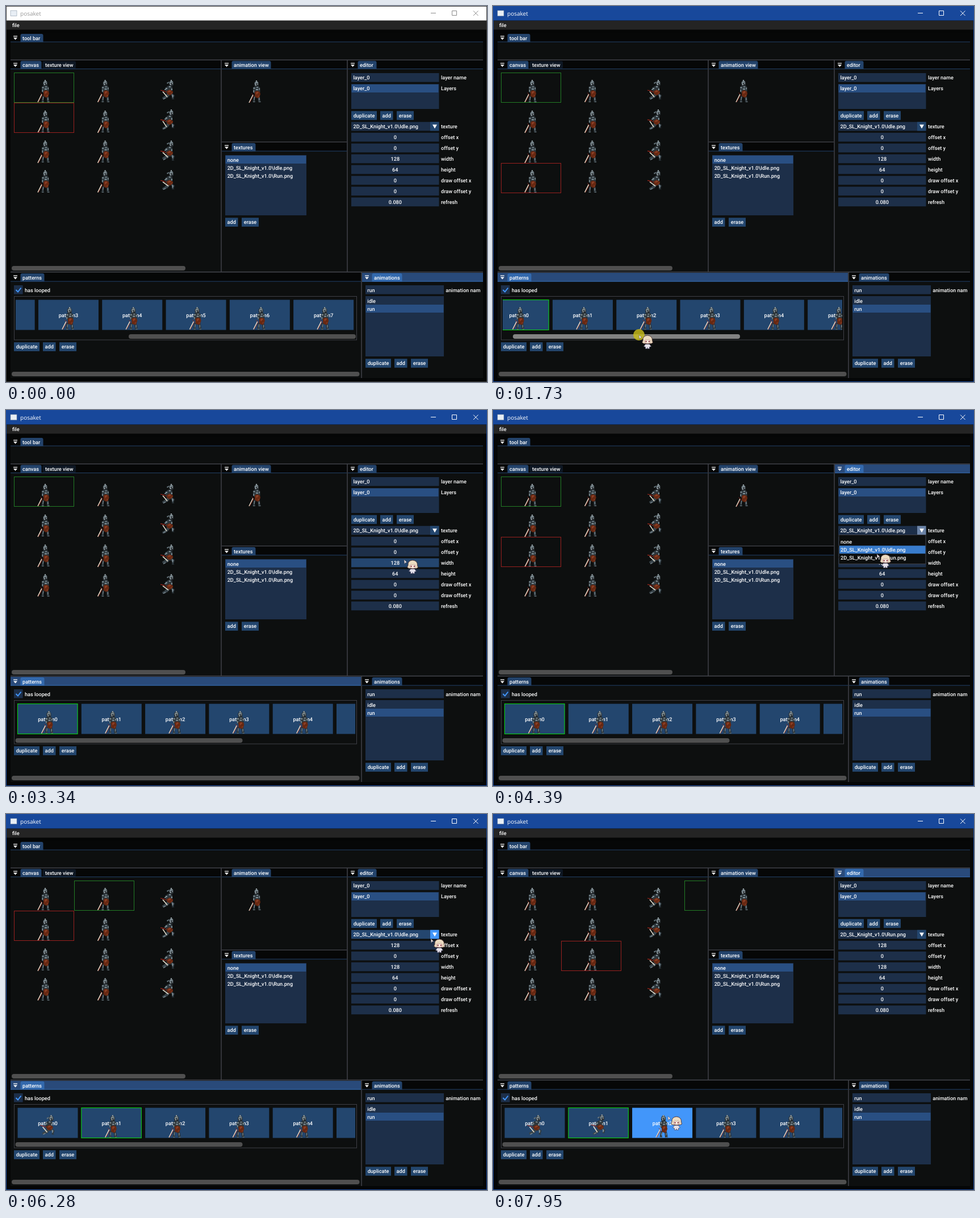
Write an HTML page that moves like this. It is 847 px wide and 661 px high and loops after 8 s.

```html
<!DOCTYPE html>
<html lang="en">
<head>
<meta charset="utf-8">
<title>posaket</title>
<style>
html, body { margin: 0; width: 100%; height: 100%; overflow: hidden; background: #050606; }
svg { display: block; width: 100%; height: 100%; }
text { font: 500 9.15px Roboto, sans-serif; fill: #fff; white-space: pre; text-rendering: geometricPrecision; }
#title { font: 400 10px "Open Sans", sans-serif; }
</style>
</head>
<body>
<svg id="stage" viewBox="0 0 847 661"></svg>
<script>
const C = {
  win: '#0d0f0f', bar: '#060707', barOn: '#294a7a', tab: '#23436b', tabOn: '#3369ad',
  tabOff: '#0e1723', btn: '#23466e', hot: '#4296fa', frame: '#1d2f49', frameHot: '#24466f',
  row: '#294f82', rowHot: '#397ccc', line: '#3f4047', grab: '#4f4f4f'
};
const LOOP = 8000;
const ROW = 15.6; // height of one control

// markup helpers
const rect = (x, y, w, h, fill, more = '') =>
  `<rect x="${x}" y="${y}" width="${w}" height="${h}" fill="${fill}" ${more}/>`;
const text = (x, cy, s, more = '') => `<text x="${x}" y="${cy + 3.3}" ${more}>${s}</text>`;
const path = (d, fill, more = '') => `<path d="${d}" fill="${fill}" ${more}/>`;
const stroke = (d, color, w = 1, more = '') => path(d, 'none', `stroke="${color}" stroke-width="${w}" ${more}`);
const button = (x, y, w, s) => rect(x, y, w, ROW, C.btn) + text(x + w / 2, y + 7.8, s, 'text-anchor="middle"');
const buttons = (x, y) => button(x, y, 45, 'duplicate') + button(x + 51, y, 22.5, 'add') + button(x + 80, y, 30, 'erase');
const grab = (x, y, w, more = '') => rect(x, y, w, 8, C.grab, `rx="4" ${more}`);
const use = (id, x, y, more = '') => `<use href="#${id}" x="${x}" y="${y}" ${more}/>`;

// knight sprites, drawn in a 105.5 x 52.8 cell
const head = (x, y) => `<g transform="translate(${x} ${y})">` +
  path('M1 4l3-4h2l3 4v5l-3 2h-3l-2-2z', '#2a3034') +
  path('M2 4l2-2h3l1 2v1h-4v2h-2z', '#7d8b91') +
  path('M4 0h2v1.500h-2zM3 7h1.500v2h-1.500zM6 6h2v1h-2z', '#b9c5c9') + '</g>';

function idle(bob) {
  return path('M50 41h4l-2 6 1 5h-4.500zM57 42h4l1.500 10h-4.500z', '#283035') +
    path('M51 43h1.500l-1 6h-1zM59 44h1.500v5h-1.500zM49 51h3.500v1h-3.500zM59 51h3.500v1h-3.500z', '#74838a') +
    `<g transform="translate(0 ${bob})">` +
    path('M49 25l4-2h6l2.500 3v7l-2 3h-8l-2.500-3z', '#2e373c') +
    path('M49.500 25.500h3v2h-3zM55 24.500h3v1.500h-3zM54 28h4v2h-4zM49.500 30h1.500v4h-1.500zM59.500 26.500h1.500v3h-1.500z', '#84949b') +
    head(50, 13) +
    path('M52 33l4-2 5 2 1 4-2 6-4 1-4-3z', '#672812') +
    path('M54 34.500l3-2 2 1.500-4 4zM57 41l3-2-1 3z', '#8c4128') +
    stroke('M49 38L42 52', '#e6dfcd', 1.6) +
    stroke('M46.500 35.500l4 4M50 39.500l-7 12.500', '#95281c', .8) + '</g>';
}

function run(n) {
  const a = [0, -1, 1, 2][n], k = [0, 3, -2, 1][n], y = [0, -1, 1, 0][n];
  return `<g transform="translate(0 ${y})">` +
    path(`M52 36l5 3-4 5-5 ${2 + k / 2}-4 1-1-3 5-3z`, '#384349') +
    path(`M55 36l6 1 4 3-2 ${6 - k / 2} 2 1h-5l1-6-6-2z`, '#2d373d') +
    path('M60 38l3 2-1 4h-1.500zM45 46l4-2v1.500l-4 2z', '#7c8b94') +
    path('M48 27l6-4 7 2v7l-4 6-7-2z', '#2e373c') +
    path('M49 27h3v2h-3zM55 24h3v2h-3zM47 29h3v1.500h-3zM59 28h2v3h-2z', '#84949b') +
    path('M51 18l4-2v2l-3 2z', '#66757c') + head(54, 13) +
    path('M50 33l6-3 6 3v3l-5 4-5-2z', '#672812') +
    path('M53 33l4-2 2 2-5 2zM57 37l4-2-1 2z', '#8c4128') +
    stroke(`M44 33.500L${52 + a} ${43 - a}`, '#e6dfcd', 1.6) +
    stroke('M40 31l7 1.500 2 2', '#a3281b', 1.2) + '</g>';
}

// cells: columns 0-1 hold the idle sheet, 2-3 the run sheet
const cellX = c => [14, 119.6, 232, 337.4][c];
const cellY = r => 117 + r * 52.9;
const outline = (id, color) => `<rect id="${id}" width="105" height="52" fill="none" stroke="${color}"/>`;

const panels = {
  tools: ['tool bar', 8, 48, 832, 46, 40],
  canvas: ['canvas', 8, 95.5, 370, 371, 37],
  view: ['animation view', 380, 95.5, 220, 142, 69],
  textures: ['textures', 380, 240, 220, 227, 42],
  editor: ['editor', 602, 95.5, 238, 371, 33],
  patterns: ['patterns', 8, 469, 617, 185, 42],
  anims: ['animations', 627, 469, 213, 185, 53]
};

function panel(id) {
  const [label, x, y, w, h, tw] = panels[id];
  return rect(x, y, w, h, C.win) + rect(x, y, w, ROW, C.bar, `id="${id}Bar"`) +
    path(`M${x + 17.5} ${y + ROW}v-11.500q0-3 3-3h${tw - 6}q3 0 3 3v11.500z`, C.tab, `id="${id}Tab"`) +
    rect(x, y + ROW - 1, w, 1, C.tab, `id="${id}Line"`) +
    path(`M${x + 5} ${y + 4.5}h7v1.300h-7zM${x + 5} ${y + 7.500}h7l-3.500 4z`, '#fff') +
    text(x + 21, y + 8.2, label);
}

const fields = ['offset x', 'offset y', 'width', 'height', 'draw offset x', 'draw offset y', 'refresh'];
const values = ['0', '0', '128', '64', '0', '0', '0.080'];
const fieldY = i => 222.8 + i * 18.97;
const files = ['2D_SL_Knight_v1.0\\Idle.png', '2D_SL_Knight_v1.0\\Run.png'];
const patX = i => 20.5 + i * 112.3;
const range = n => [...Array(n).keys()];

function build() {
  let s = '<defs>' + [0, 1].map(i => `<g id="idle${i}">${idle(i)}</g>`).join('') +
    range(4).map(i => `<g id="run${i}">${run(i)}</g>`).join('') +
    '<clipPath id="canvasClip"><rect x="9" y="112" width="366" height="344"/></clipPath>' +
    '<clipPath id="listClip"><rect x="17" y="512" width="598" height="64"/></clipPath>' +
    '<clipPath id="animClip"><rect x="627" y="485" width="209" height="169"/></clipPath></defs>';

  s += rect(0, 0, 847, 661, '#050606') + rect(0, 0, 847, 25.5, '#fff', 'id="caption"') +
    rect(8, 8, 11, 9.5, '#e8eef5', 'stroke="#8a99aa" stroke-width=".6"') +
    '<text id="title" x="25" y="16.6">posaket</text>' +
    stroke('M748 12.500h9M785.500 8.500h8v8h-8zM823 8.500l8.500 8.500M831.500 8.500l-8.500 8.500', '#999', 1, 'id="winBtns"') +
    rect(1, 26, 845, ROW, '#242424') + text(11, 34, 'file') +
    rect(.5, .5, 846, 660, 'none', 'id="edge"');

  s += Object.keys(panels).map(panel).join('') +
    rect(64.5, 97, 58.5, 13, C.tabOff, 'rx="2"') + text(69, 103.7, 'texture view') +
    stroke('M8 94.800H840M379 95V467M380 239H600M601 95V467M8 467.600H840M626 468V654', C.line, 1.6);

  // canvas and preview
  s += '<g clip-path="url(#canvasClip)">';
  for (let r = 0; r < 4; r++)
    for (let c = 0; c < 3; c++)
      s += use(c < 2 ? 'idle' + (r === 1 || r === 2 ? 1 : 0) : 'run' + r, cellX(c), cellY(r));
  s += outline('red', '#98201f') + outline('green', '#227c25') + '</g>' +
    grab(10, 457, 306) + use('idle0', 386, 117, 'id="preview"');

  // texture list
  s += rect(386, 262, 143, 106, C.frame) + rect(386.5, 263, 142, 14, C.row) +
    ['none', ...files].map((f, i) => text(389.7, 270.3 + i * 14, f)).join('') +
    button(386, 372.3, 22.5, 'add') + button(415, 372.3, 30, 'erase');

  // editor
  s += rect(608, 118, 154.5, ROW, C.frame) + text(611.5, 126, 'layer_0') + text(766, 126, 'layer name') +
    rect(608, 137, 154.5, 44, C.frame) + rect(608.5, 138, 153, 14, C.row) +
    text(611.5, 145, 'layer_0') + text(766, 145, 'Layers') + buttons(608, 184.7) +
    rect(608, 203.8, 154.5, ROW, C.frame, 'id="combo"') + rect(747, 203.8, 15.5, ROW, C.btn, 'id="arrow"') +
    path('M751 208.500h8l-4 7z', '#fff') + text(611.5, 211.5, files[0], 'id="file"') + text(766, 211.5, 'texture') +
    fields.map((f, i) => rect(608, fieldY(i), 154.5, ROW, C.frame, `id="field${i}"`) +
      text(685.3, fieldY(i) + 7.8, values[i], `id="value${i}" text-anchor="middle"`) +
      text(766, fieldY(i) + 7.8, f)).join('');

  // patterns
  s += rect(14, 491, ROW, ROW, C.frame) + stroke('M17.500 499l3.500 3.500 5.500-7', C.hot, 2) + text(33, 499.2, 'has looped') +
    rect(14.5, 510.5, 603, 76.5, 'none', `stroke="${C.line}"`) +
    '<g clip-path="url(#listClip)"><g id="strip">' +
    range(8).map(i => rect(patX(i), 516.5, 106, 53, C.btn, `id="pat${i}"`) +
      text(patX(i) + 53, 543.2, 'pattern' + i, 'text-anchor="middle"') +
      use('idle0', patX(i), 516.5, `id="pose${i}"`)).join('') +
    rect(0, 516.5, 105.5, 53, 'none', 'id="chosen" stroke="#06d80e"') + '</g></g>' +
    grab(16.5, 577, 400, 'id="thumb"') + buttons(14, 591.2) + grab(10, 643, 612.5);

  // animations
  s += '<g clip-path="url(#animClip)">' + rect(633, 491, 138, ROW, C.frame) + text(636.3, 499.2, 'run') +
    text(774.3, 499.2, 'animation name') + '</g>' +
    rect(633, 510, 138, 106, C.frame) + rect(633.5, 525, 137, 14, C.row) +
    text(636.3, 518.2, 'idle') + text(636.3, 532.3, 'run') + buttons(633, 620.2);

  // drop-down
  s += '<g id="popup">' + rect(609, 219.5, 153, 51, '#0c0e0e', `stroke="${C.line}"`) +
    files.map((f, i) => rect(610, 238.5 + i * 14, 151.5, 14, 'none', `id="item${i}"`)).join('') +
    ['none', ...files].map((f, i) => text(612, 231.3 + i * 14.1, f)).join('') + '</g>';

  // pointer with its little companion
  s += '<g id="pointer"><circle id="press" r="10" fill="#c9bd1b" opacity=".82"/>' +
    path('M0 0l5 5-2.500.300-1.700 2.500z', '#f3e6ea', 'stroke="#333" stroke-width=".4"') +
    path('M7 10q-1-8 8-9 9 1 8.500 9l1 4-3 1.500h-13l-3-2z', '#ecdcc2', 'stroke="#4b3030" stroke-width=".9"') +
    path('M10 10l3-2 2 1.500 2-1.500 3.500 2v3.500q-5 4-10.500 0z', '#f9e6dc', 'stroke="#9a7466" stroke-width=".5"') +
    path('M11.500 10.500h2v2.500h-2zM17 10.500h2v2.500h-2z', '#8d3c45') +
    path('M11.500 16.500h7l3 4-3 1v3h-3l-.500-2-.500 2h-3v-3l-3-1z', '#e4e1ea', 'stroke="#54506a" stroke-width=".8"') + '</g>';
  return s;
}

const stage = document.getElementById('stage');
stage.innerHTML = build();
const el = {};
stage.querySelectorAll('[id]').forEach(e => el[e.id] = e);
const set = (id, attrs) => { for (const k in attrs) el[id].setAttribute(k, attrs[k]); };
const show = (id, on) => set(id, { display: on ? 'inline' : 'none' });

// pointer stops: time, x, y
const stops = [
  [300, 764, 668], [820, 462, 594], [970, 438, 579], [1080, 438, 579], [1735, 257, 578], [1930, 237, 578],
  [2300, 250, 572], [3200, 700, 264], [3345, 701, 263], [3720, 750, 212], [3880, 750, 212],
  [4390, 676, 253], [4560, 674, 260], [4730, 674, 260], [5230, 194, 529], [5540, 192, 528],
  [6270, 748, 219], [6370, 752, 213], [6500, 752, 213], [6880, 690, 260], [7060, 690, 260], [7900, 309, 531], [7950, 308, 531]
];
const presses = [[1000, 2000], [3770, 3870], [4600, 4700], [5430, 5530], [6400, 6500], [6940, 7040]];

function pointerAt(t) {
  const i = stops.findIndex(s => s[0] > t);
  if (i < 0) return stops[stops.length - 1].slice(1);
  if (!i) return stops[0].slice(1);
  const [a, b] = [stops[i - 1], stops[i]];
  const k = (t - a[0]) / (b[0] - a[0]);
  const e = k * k * (3 - 2 * k);
  return [a[1] + (b[1] - a[1]) * e, a[2] + (b[2] - a[2]) * e];
}

function draw(t) {
  const [px, py] = pointerAt(t);
  const pressed = presses.some(([a, b]) => t >= a && t < b);
  const dragging = t >= 1000 && t < 2000;
  const open = t >= 3840 && t < 4660 || t >= 6460 && t < 7000;
  const ran = [t >= 4660, t >= 7000];
  const chosen = t >= 5480 ? 1 : 0;
  const focus = t < 1000 ? 'anims' : t < 3840 ? 'patterns' : t < 5480 ? 'editor' : t < 6460 ? 'patterns' : 'editor';
  const active = t >= 1000;
  const over = (x, y, w, h) => !dragging && px >= x && px < x + w && py >= y && py < y + h;

  set('caption', { fill: active ? '#18489b' : '#fff' });
  set('edge', { stroke: active ? '#18489b' : '#3a3a3a' });
  el.title.style.fill = active ? '#fff' : '#999';
  set('winBtns', { stroke: active ? '#fff' : '#8a8a8a' });
  for (const id in panels) {
    const on = id === focus;
    set(id + 'Bar', { fill: on ? C.barOn : C.bar });
    set(id + 'Tab', { fill: on ? C.tabOn : C.tab });
    set(id + 'Line', { fill: on ? C.tabOn : C.tab });
  }

  // playback
  const step = Math.floor(t / 87.3 + 2.5) % 8;
  const cell = i => ran[i] ? [2 + i, 0] : [i % 2, i >> 1];
  const pose = i => ran[i] ? '#run' + i : '#idle' + (i > 1 && i < 6 ? 1 : 0);
  const mark = (id, [c, r]) => set(id, { x: Math.round(cellX(c)) + .5, y: Math.round(cellY(r)) + .5 });
  mark('red', cell(step));
  mark('green', cell(chosen));
  set('preview', { href: pose(step) });

  // pattern strip
  const thumb = dragging ? Math.min(216, Math.max(16.5, px - 222)) : t < 1000 ? 216 : 16.5;
  const scroll = (thumb - 16.5) * 1.506;
  set('thumb', { x: thumb, fill: dragging ? '#828282' : over(thumb, 577, 400, 8) ? '#696969' : C.grab });
  set('strip', { transform: `translate(${-scroll} 0)` });
  set('chosen', { x: patX(chosen) });
  for (let i = 0; i < 8; i++) {
    const hot = over(patX(i) - scroll, 516, 106, 53);
    set('pat' + i, { fill: hot ? pressed ? '#0f87fa' : C.hot : C.btn });
    set('pose' + i, { href: ran[i] ? pose(i) : '#idle0' });
  }

  // editor
  const onCombo = !open && over(608, 203.8, 154.5, ROW);
  el.file.textContent = files[ran[chosen] ? 1 : 0];
  el.value0.textContent = chosen * 128;
  fields.forEach((f, i) => set('field' + i, { fill: !open && over(608, fieldY(i), 154, ROW) ? C.frameHot : C.frame }));
  set('combo', { fill: onCombo ? C.frameHot : C.frame });
  set('arrow', { fill: open ? '#6b83a6' : onCombo ? C.hot : C.btn });
  show('popup', open);
  const hotItem = py < 238 ? -1 : py < 254.5 ? 0 : 1;
  [0, 1].forEach(i => set('item' + i, { fill: i === hotItem ? C.rowHot : i ? 'none' : '#1d3a5c' }));

  set('pointer', { transform: `translate(${px} ${py})` });
  show('pointer', t >= 300);
  show('press', pressed);
}

// the picture advances in even ticks after a short hold
const TICK = 69.82;
const tick = t => t < 125 ? 0 : 130 + TICK * Math.max(0, Math.floor((t - 130) / TICK + .15));
const start = performance.now();
function loop() {
  draw(tick((performance.now() - start) % LOOP));
  requestAnimationFrame(loop);
}
loop();
</script>
</body>
</html>
```
